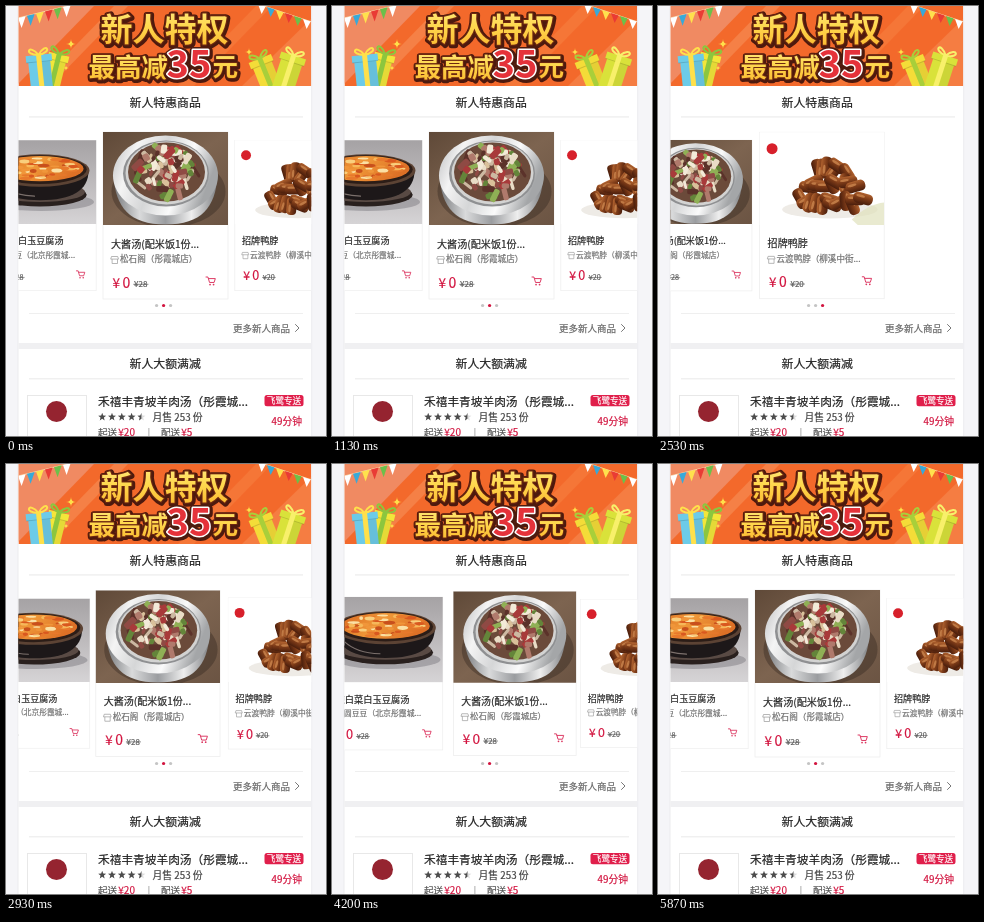
Recreate the animation shown at these times as an HTML page. Size 320 px wide and 430 px high, loop 5.99 s.

```html
<!DOCTYPE html>
<html lang="zh-CN">
<head>
<meta charset="utf-8">
<title>新人特惠</title>
<style>
html, body { margin: 0; width: 100%; height: 100%; overflow: hidden; background: #f5f5f8; }
svg { display: block; width: 320px; height: 430px; }
svg svg { width: auto; height: auto; }
text { font-family: "Noto Sans CJK SC", "Noto Sans CJK", "Noto Sans", sans-serif; white-space: pre; }
.art { font-weight: 900; stroke-linejoin: round; }
</style>
</head>
<body>
<svg id="stage" viewBox="0 0 320 430" xmlns="http://www.w3.org/2000/svg"></svg>
<script>
const LOOP = 5990, FPS = 15;
const CENTER_X = 159.5, CENTER_Y = 209.5, PITCH = 139.5, DEPTH = 0.111;
const RED = '#d2143f';

// Time in ms and the slide position at the centre
const KEYS = [
  [0, 1], [1250, 1], [2067, 1.685], [2330, 2], [2480, 2], [2933, 1.055], [3040, 1],
  [3140, 1], [3600, 0.21], [3760, 0], [3860, 0], [4200, 0.83], [4400, 1], [LOOP + 10, 1]
];

let seed = 7;
const rnd = () => {
  seed = (seed * 16807) % 2147483647;
  return seed / 2147483647;
};
const pick = list => list[Math.floor(rnd() * list.length)];
const many = (n, fn) => Array.from({ length: n }, (_, i) => fn(i)).join('');

const rect = (x, y, w, h, fill, extra = '') =>
  `<rect x="${x}" y="${y}" width="${w}" height="${h}" fill="${fill}" ${extra}/>`;
const oval = (x, y, rx, ry, fill, extra = '') =>
  `<ellipse cx="${x}" cy="${y}" rx="${rx}" ry="${ry}" fill="${fill}" ${extra}/>`;
const path = (d, fill, extra = '') => `<path d="${d}" fill="${fill}" ${extra}/>`;
const line = (d, color, w = 1) =>
  path(d, 'none', `stroke="${color}" stroke-width="${w}" stroke-linecap="round" stroke-linejoin="round"`);
const text = (x, y, size, fill, str, extra = '') =>
  `<text x="${x}" y="${y}" font-size="${size}" fill="${fill}" ${extra}>${str}</text>`;
const label = (x, y, size, fill, str, anchor = 'start') =>
  text(x, y, size, fill, str, `stroke="${fill}" stroke-width=".2" text-anchor="${anchor}"`);
const grad = (id, stops, dir = 'x1="0" y1="0" x2="0" y2="1"') =>
  `<linearGradient id="${id}" ${dir}>` +
  stops.map((c, i) => `<stop offset="${i / (stops.length - 1)}" stop-color="${c}"/>`).join('') +
  '</linearGradient>';

const defs = `<defs>
  <clipPath id="page"><rect x="12.5" y="0" width="292.7" height="430"/></clipPath>
  <clipPath id="banner"><rect x="12.5" y="0" width="292.7" height="80"/></clipPath>
  <clipPath id="half"><rect x="130" y="405" width="5.4" height="12"/></clipPath>
  <clipPath id="photo"><rect x="-62.5" y="-83.5" width="125" height="93"/></clipPath>
  ${grad('gold', ['#ffeb86', '#ffd84e', '#fbb52c'])}
  ${grad('steel', ['#b9babc', '#f4f4f4', '#d5d6d7', '#fafafa', '#a4a6a8'], 'x1="0" y1="0" x2="1" y2="0.3"')}
  ${grad('side', ['#77797c', '#d9dadb', '#9b9da0', '#eeeeee', '#7d7f82'], 'x1="0" y1="0" x2="1" y2="0"')}
  ${grad('table', ['#5f4938', '#7d6450', '#6b5443'], 'x1="0" y1="0" x2="1" y2="1"')}
  ${grad('cloth', ['#a5a2a4', '#bdbabc', '#d6d4d6'])}
  ${grad('soup', ['#d9661f', '#ef9838', '#dd7026'], 'x1="0" y1="0" x2="1" y2="0.3"')}
  ${grad('wing', ['#b0622f', '#7a3917', '#4a1e0c'])}
</defs>`;

// Banner
function gift(x, y, w, h, box, ribbon, turn) {
  const m = w / 2;
  return `<g transform="translate(${x} ${y}) rotate(${turn})">` +
    rect(0, 0, w, h, box) + rect(m, 0, m, h, '#000', 'opacity=".06"') +
    rect(-2, -4, w + 4, 7, box) + rect(-2, 2.4, w + 4, 1, '#000', 'opacity=".15"') +
    rect(m - 2.5, -4, 5, h + 4, ribbon) +
    line(`M${m} -4C${m - 15} -5 ${m - 9} -17 ${m} -4C${m + 9} -17 ${m + 15} -5 ${m} -4`, ribbon, 2) +
    '</g>';
}

function flags(x0, y0, dx, dy, n) {
  const colors = ['#ffffff', '#38a9d8', '#ffe14d', '#e93b35', '#6cc04a'];
  return line(`M${x0} ${y0}l${dx * n} ${dy * n}`, '#fbe3b0', 0.8) + many(n, i => {
    const x = x0 + dx * i, y = y0 + dy * i;
    return path(`M${x} ${y}l${dx * 0.85} ${dy * 0.85}L${x + dx * 0.4} ${y + 10}Z`, colors[i % 5]);
  });
}

const spark = (x, y, r) =>
  path(`M${x} ${y - r}Q${x} ${y} ${x + r} ${y}Q${x} ${y} ${x} ${y + r}Q${x} ${y} ${x - r} ${y}Q${x} ${y} ${x} ${y - r}Z`, '#ffe04a');

function art(x, y, size, str, fill, rim, w) {
  const a = 'class="art" paint-order="stroke"';
  return text(x + 0.8, y + 1.2, size, '#4d1a0e', str, `${a} stroke="#4d1a0e" stroke-width="${w}"`) +
    text(x, y, size, fill, str, `${a} stroke="${rim}" stroke-width="${w / 2.6}"`);
}

function banner() {
  return '<g clip-path="url(#banner)">' +
    rect(12, 0, 295, 80, '#f3692b') +
    path('M12 0H88L12 78Z', '#f08a62') + path('M108 0H122L44 80H30Z', '#f58046') +
    path('M306 12V80H236Z', '#f57d42') + path('M250 0H266L188 80H172Z', '#f57637') +
    flags(12, 12, 9, -2.2, 6) + flags(252, -2, 9, 3, 6) +
    gift(44, 50, 17, 34, '#f3e63a', '#8cc63e', 14) +
    gift(22, 54, 22, 32, '#6ccbe8', '#ffe04a', -6) +
    gift(246, 60, 20, 32, '#f4dc38', '#a8cf3a', -22) +
    gift(276, 50, 22, 36, '#d9e23a', '#f8f06a', 18) +
    spark(65, 38, 5) + spark(60, 62, 3) + spark(243, 46, 4) +
    art(94.5, 34.5, 32, '新人特权', 'url(#gold)', '#6d270f', 6) +
    art(82.5, 70.5, 26.5, '最高减', 'url(#gold)', '#6d270f', 5.5) +
    art(206.5, 70, 25.5, '元', 'url(#gold)', '#6d270f', 5.5) +
    art(160.5, 72, 38, '35', '#e5323a', '#ffffff', 8) +
    '</g>';
}

// Dish pictures, in card coordinates
function tofuPot() {
  const bits = many(60, () => {
    const a = rnd() * 6.28, r = Math.sqrt(rnd()) * 0.9;
    return oval(47 * r * Math.cos(a), -52 + 13 * r * Math.sin(a), 2 + rnd() * 5, 0.8 + rnd() * 1.5,
      pick(['#f6b85a', '#fbe0a4', '#d9581f', '#f0963a', '#c84f1c', '#f9cf7d', '#e8792c']));
  });
  return rect(-63, -84, 126, 94, 'url(#cloth)') +
    oval(2, -15, 58, 10, '#77747a', 'opacity=".45"') +
    oval(0, -23, 52, 13, '#29201e') + oval(0, -26, 50, 11, '#594a44') +
    path('M-54 -50C-54 -28 -36 -17 0 -17S54 -28 54 -50Z', '#1d1819') +
    oval(0, -50, 55, 18, '#5c4334') + oval(0, -51, 52, 16, '#2c1d17') +
    oval(0, -52, 48.5, 14, 'url(#soup)') + bits +
    line('M-46 -36C-36 -26 -20 -22 -6 -21.5', '#7b706c', 1.2);
}

function beefPot() {
  const bits = many(95, () => {
    const a = rnd() * 6.28, r = Math.sqrt(rnd()) * 0.88;
    const x = 1 + 37 * r * Math.cos(a), y = -44 + 28 * r * Math.sin(a);
    const w = 6 + rnd() * 8, h = 3 + rnd() * 4;
    return rect(x - w / 2, y - h / 2, w, h,
      pick(['#8f4a44', '#b07a6c', '#e9dcc6', '#f3ead8', '#64853a', '#8fb055', '#a83a3a', '#5b322a', '#d9c09a', '#cdb9a2']),
      `rx="1.8" transform="rotate(${rnd() * 180} ${x} ${y})"`);
  });
  return rect(-63, -84, 126, 94, 'url(#table)') +
    oval(3, -24, 57, 36, '#33261e', 'opacity=".4"') +
    path('M-52 -40C-50 -8 -36 9 0 9S50 -8 52 -40Z', 'url(#side)') +
    oval(0, -40, 52.5, 40, 'url(#steel)') +
    oval(0.5, -42, 43, 33, '#8f9092') + oval(1, -42.5, 41, 31.5, '#d3d3d2') +
    oval(1, -43.5, 38.5, 29.5, '#6b4a3a') + bits;
}

function duckWings() {
  const wings = many(27, i => {
    const row = i < 6 ? 0 : i < 15 ? 1 : 2, n = [6, 9, 12][row], k = i - [0, 6, 15][row];
    const half = [17, 27, 35][row];
    const x = 9 - half + 2 * half * (k + 0.5) / n + rnd() * 4 - 2, y = -46 + row * 16 + rnd() * 8 - 4;
    return `<g transform="translate(${x} ${y}) rotate(${rnd() * 180 - 90})">` +
      rect(-10, -5.5, 20, 11, 'url(#wing)', 'rx="4.5"') +
      oval(-3, -2, 4.5, 1.3, '#d58f55', 'opacity=".7"') + '</g>';
  });
  return rect(-63, -84, 126, 94, '#fff') +
    oval(8, -6, 48, 9, '#eeebe6') +
    path('M30 4C40 -6 52 -12 62.5 -13V9.5H36Z', '#e0e2bd', 'opacity=".7"') + wings +
    oval(-50, -67, 5.5, 5.5, '#d7202b');
}

function cart(x, y) {
  return `<g transform="translate(${x} ${y}) scale(.88)">` +
    line('M0 0H2.2L4 6.2H9.2L10.6 1.8H3', '#dc3560', 1.1) +
    oval(4.6, 8.6, 1, 1, '#dc3560') + oval(8.6, 8.6, 1, 1, '#dc3560') + '</g>';
}

function card({ dish, name, shop, was }) {
  return '<g class="card">' +
    rect(-62.5, -83.5, 125, 167, '#fff', 'stroke="#eeeeee" stroke-width=".8"') +
    `<g clip-path="url(#photo)">${dish()}</g>` +
    label(-54.5, 32, 10.1, '#262626', name) +
    line('M-53.6 41H-47.8L-47 43.6H-54.4ZM-53.4 44V48H-48V44', '#999', 0.7) +
    label(-45.5, 46.8, 8.6, '#707070', shop) +
    label(-53, 72, 13.5, RED, '¥') + label(-43, 72, 14, RED, '0') +
    label(-31.5, 71.5, 8, '#5a5a5a', '¥' + was) + line('M-31.8 68.8H-17.5', '#5a5a5a', 0.7) +
    cart(40.5, 61.5) + '</g>';
}

const items = [
  { dish: tofuPot, name: '辣白菜白玉豆腐汤', shop: '圆豆豆（北京彤霞城...', was: 28 },
  { dish: beefPot, name: '大酱汤(配米饭1份...', shop: '松石阁（彤霞城店）', was: 28 },
  { dish: duckWings, name: '招牌鸭脖', shop: '云渡鸭脖（柳溪中街...', was: 20 }
];

function star(cx, cy, r, fill, extra) {
  const pts = Array.from({ length: 10 }, (_, i) => {
    const a = i * Math.PI / 5 - Math.PI / 2, d = i % 2 ? r * 0.42 : r;
    return [cx + d * Math.cos(a), cy + d * Math.sin(a)];
  });
  return path('M' + pts.join('L') + 'Z', fill, extra);
}

function heading(y, str) {
  return label(159.2, y, 11.9, '#222', str, 'middle') + rect(23, y + 10, 274, 0.9, '#e6e6e6');
}

function shopRow() {
  return rect(21.5, 389.5, 59, 50, '#fff', 'stroke="#e6e6e6" stroke-width=".9"') +
    oval(50.5, 405.5, 10.5, 10.5, '#952430') +
    label(92, 399.8, 11.7, '#222', '禾禧丰青坡羊肉汤（彤霞城...') +
    many(5, i => star(96.2 + i * 9.8, 411, 4.2, i < 4 ? '#4c4c4c' : '#ddd')) +
    star(135.4, 411, 4.2, '#4c4c4c', 'clip-path="url(#half)"') +
    label(146.5, 414.8, 9.8, '#444', '月售 253 份') +
    label(92, 429.6, 9.6, '#555', '起送') + label(112.3, 429.6, 10, RED, '¥20') +
    rect(142.5, 422, 0.8, 8, '#999') +
    label(155, 429.6, 9.6, '#555', '配送') + label(175.3, 429.6, 10, RED, '¥5') +
    rect(258.5, 389, 39, 11.3, '#e01f4b', 'rx="2.5"') +
    label(278, 398, 8.6, '#fff', '飞鹭专送', 'middle') +
    label(296, 419, 9.8, RED, '49分钟', 'end');
}

const stage = document.getElementById('stage');
stage.innerHTML = defs +
  rect(0, 0, 320, 430, '#f5f5f8') + rect(11.5, 0, 294.7, 430, '#ebebee') +
  '<g clip-path="url(#page)">' +
  rect(12, 0, 295, 430, '#fff') + banner() + heading(100.5, '新人特惠商品') +
  items.map(card).join('') +
  many(3, i => `<circle class="dot" cx="${150.6 + i * 7}" cy="299.5" r="1.6"/>`) +
  rect(23, 307, 274, 0.8, '#ececec') +
  label(227, 325.6, 9.5, '#666', '更多新人商品') + line('M289.5 318.5L293 322L289.5 325.5', '#777', 1) +
  rect(12, 337, 295, 6, '#f0f0f2') + heading(362.4, '新人大额满减') + shopRow() + '</g>';

const cards = stage.querySelectorAll('.card');
const dots = stage.querySelectorAll('.dot');

const slopes = KEYS.slice(1).map(([t, v], i) => (v - KEYS[i][1]) / (t - KEYS[i][0]));
const tangents = KEYS.map((_, i) => {
  const a = slopes[i - 1] || 0, b = slopes[i] || 0;
  return a * b > 0 ? 2 * a * b / (a + b) : 0;
});

// Monotone cubic through the keys
function position(t) {
  let i = 0;
  while (i < KEYS.length - 2 && t >= KEYS[i + 1][0]) i++;
  const [t0, a] = KEYS[i], [t1, b] = KEYS[i + 1];
  const h = t1 - t0, u = (t - t0) / h, w = 1 - u;
  return a * (1 + 2 * u) * w * w + b * u * u * (3 - 2 * u) +
    h * u * w * (tangents[i] * w - tangents[i + 1] * u);
}

function draw(t) {
  const pos = position(Math.floor((t + 5) * FPS / 1000) * 1000 / FPS);
  cards.forEach((el, i) => {
    const p = i - pos, s = 1 / (1 + DEPTH * Math.abs(p));
    el.setAttribute('transform', `translate(${CENTER_X + p * PITCH * s} ${CENTER_Y}) scale(${s})`);
  });
  dots.forEach((el, i) => el.setAttribute('fill', i === Math.round(pos) ? RED : '#c4c4c4'));
}

const start = performance.now();
function tick() {
  draw((performance.now() - start) % LOOP);
  requestAnimationFrame(tick);
}
tick();
</script>
</body>
</html>
```
